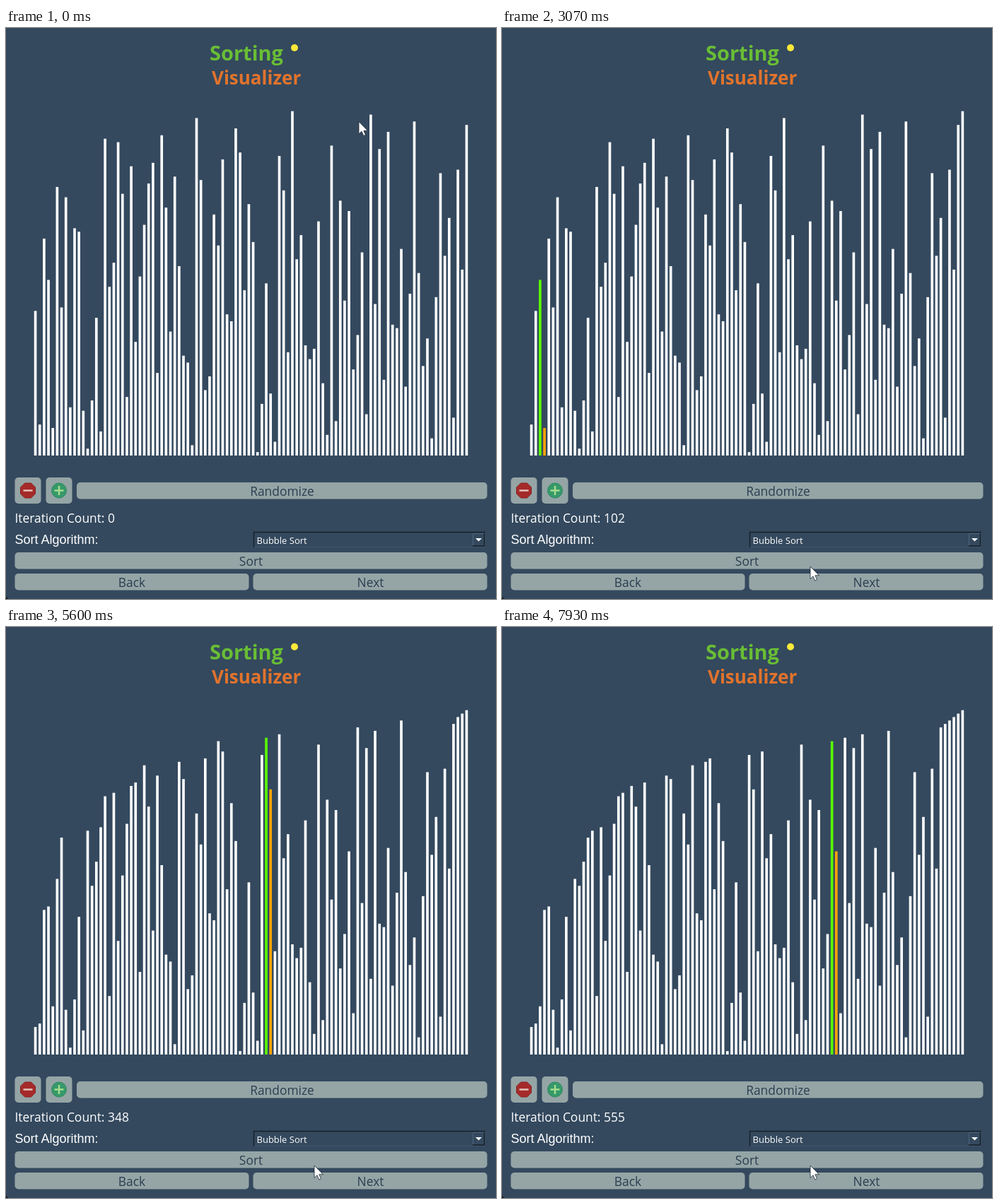
An HTML page for the animation above (8 s loop, 693x808 px).

```html
<!DOCTYPE html>
<html lang="en">
<head>
<meta charset="utf-8">
<title>Sorting Visualizer</title>
<style>
  html, body { margin: 0; width: 100%; height: 100%; overflow: hidden; background: #34495e; }
  svg { display: block; width: 100vw; height: 100vh; }
  text { font-family: "Open Sans", "Noto Sans", sans-serif; font-size: 17.4px; fill: #fff; }
  .button { fill: #95a5a6; }
  .caption { fill: #2c3e50; text-anchor: middle; }
  .title { font-weight: 700; }
</style>
</head>
<body>
<svg viewBox="0 0 693 808">
  <rect width="693" height="808" fill="#34495e"/>
  <path d="M0 802 Q0 808 6 808 H0Z" fill="#10161d"/>

  <text class="title" x="288" y="46" style="font-size:29px;fill:#69bd35">Sorting</text>
  <text class="title" x="291" y="80" style="font-size:26px;fill:#e2732c">Visualizer</text>
  <circle cx="408" cy="28" r="5" fill="#fbe93a"/>

  <g id="bars"></g>

  <g class="button">
    <rect x="12.5" y="636" width="37" height="37" rx="5"/>
    <rect x="56.5" y="636" width="37" height="37" rx="5"/>
    <rect x="100" y="643" width="580.5" height="23.5" rx="5"/>
    <rect x="12.5" y="742" width="668" height="23.5" rx="5"/>
    <rect x="12.5" y="772" width="331" height="23.5" rx="5"/>
    <rect x="349.5" y="772" width="331" height="23.5" rx="5"/>
  </g>
  <path d="M26.500 644h9l6 6v9l-6 6h-9l-6-6v-9z" fill="#a52a2a" stroke="#8a2323" stroke-linejoin="round"/>
  <path d="M24.500 654.500h13" stroke="#e3c3bd" stroke-width="2.500"/>
  <circle cx="75" cy="654.500" r="10.500" fill="#36996a" stroke="#2d8a5e"/>
  <path d="M68.500 654.500h13M75 648v13" stroke="#a5dc8c" stroke-width="2.500"/>

  <text class="caption" x="390.500" y="662">Randomize</text>
  <text class="caption" x="346.500" y="761">Sort</text>
  <text class="caption" x="178" y="791">Back</text>
  <text class="caption" x="515.500" y="791">Next</text>
  <text id="count" x="12.500" y="700"></text>
  <text x="12.500" y="730" style="font:18px 'Liberation Sans',Arial,sans-serif">Sort Algorithm:</text>

  <path d="M350.500 735V713.500H678" fill="none" stroke="#17212b" stroke-width="1.500"/>
  <path d="M351 734.500H677.500V714" fill="none" stroke="#40566d"/>
  <path d="M660.500 733V715.500H676" fill="none" stroke="#4c637b"/>
  <path d="M660 733H676.500V715" fill="none" stroke="#17212b" stroke-width="1.500"/>
  <path d="M664 722h9l-4.500 4.500z" fill="#fff"/>
  <text x="354.500" y="729.500" style="font-size:13px">Bubble Sort</text>

  <path id="cursor" d="M0 0V17.500L4 13.700L6.700 20L9.500 18.800L6.900 12.700H12.500Z"
        fill="#fff" stroke="#1b2530" stroke-width=".8"/>
</svg>
<script>
const LOOP = 8000;
const START = [
  42, 9, 63, 51, 8, 78, 43, 75, 14, 66, 65, 13, 2, 16, 40, 7, 92, 49, 56, 91,
  76, 17, 84, 33, 52, 67, 79, 85, 24, 93, 72, 36, 81, 55, 29, 27, 3, 98, 80, 19,
  23, 70, 61, 86, 41, 39, 95, 88, 48, 73, 62, 1, 15, 50, 18, 4, 87, 77, 30, 100,
  57, 64, 32, 28, 31, 68, 21, 6, 90, 10, 74, 45, 71, 25, 35, 59, 12, 99, 44, 89,
  22, 94, 38, 37, 60, 20, 47, 97, 53, 26, 34, 5, 46, 82, 58, 69, 11, 83, 54, 96
];
// [tick, comparisons made], interpolated linearly
const PACE = [[29, 1], [35, 34], [41, 71], [46, 102], [58, 175], [74, 281], [84, 348],
  [92, 392], [93, 399], [103, 462], [106, 482], [107, 488], [119, 555]];
const BASE = 605, UNIT = 4.873, LEFT = 39.75, PITCH = 6.16;

const countText = document.getElementById("count");
const cursor = document.getElementById("cursor");
const group = document.getElementById("bars");
const bars = START.map((_, i) => {
  const bar = document.createElementNS(group.namespaceURI, "rect");
  bar.setAttribute("x", LEFT + PITCH * i);
  bar.setAttribute("width", 3.65);
  return group.appendChild(bar);
});

// Fifteen ticks a second, on 10 ms boundaries
function tickAt(time) {
  const rest = time % 200;
  return 3 * Math.floor(time / 200) + (rest >= 130 ? 2 : rest >= 70 ? 1 : 0);
}

function countAt(tick) {
  if (tick < PACE[0][0]) return 0;
  const next = Math.max(1, PACE.findIndex(([at]) => at >= tick));
  const [t0, c0] = PACE[next - 1], [t1, c1] = PACE[next];
  return Math.round(c0 + (c1 - c0) * (tick - t0) / (t1 - t0));
}

// Bubble sort paused just before the swap of the latest comparison
function sortState(count) {
  const values = [...START];
  let j = -1, end = values.length - 1;
  for (let step = 1; step <= count; step++) {
    if (j >= 0 && values[j] > values[j + 1]) {
      [values[j], values[j + 1]] = [values[j + 1], values[j]];
    }
    if (++j >= end) { j = 0; end--; }
  }
  return { values, active: j };
}

const bezier = (a, b, c, d, s) => {
  const r = 1 - s;
  return r * r * r * a + 3 * r * r * s * b + 3 * r * s * s * c + s * s * s * d;
};

function moveCursor(tick) {
  const u = Math.min(1, Math.max(0, (tick - 3) / 15));
  const s = u * u * (3 - 2 * u);
  const x = bezier(499, 557, 468, 436, s), y = bezier(132.5, 300, 762, 762, s);
  cursor.setAttribute("transform", `translate(${x} ${y})`);
}

function draw(tick) {
  const count = countAt(tick);
  const { values, active } = sortState(count);
  bars.forEach((bar, i) => {
    const height = values[i] * UNIT;
    bar.setAttribute("y", BASE - height);
    bar.setAttribute("height", height);
    bar.setAttribute("fill", active < 0 ? "#fff"
      : i === active ? "#5aff00" : i === active + 1 ? "#ffa500" : "#fff");
  });
  countText.textContent = `Iteration Count: ${count}`;
  moveCursor(tick);
}

const origin = performance.now();
let shown = -1;
function frame() {
  const tick = tickAt((performance.now() - origin) % LOOP);
  if (tick !== shown) draw(shown = tick);
  requestAnimationFrame(frame);
}
frame();
</script>
</body>
</html>
```
